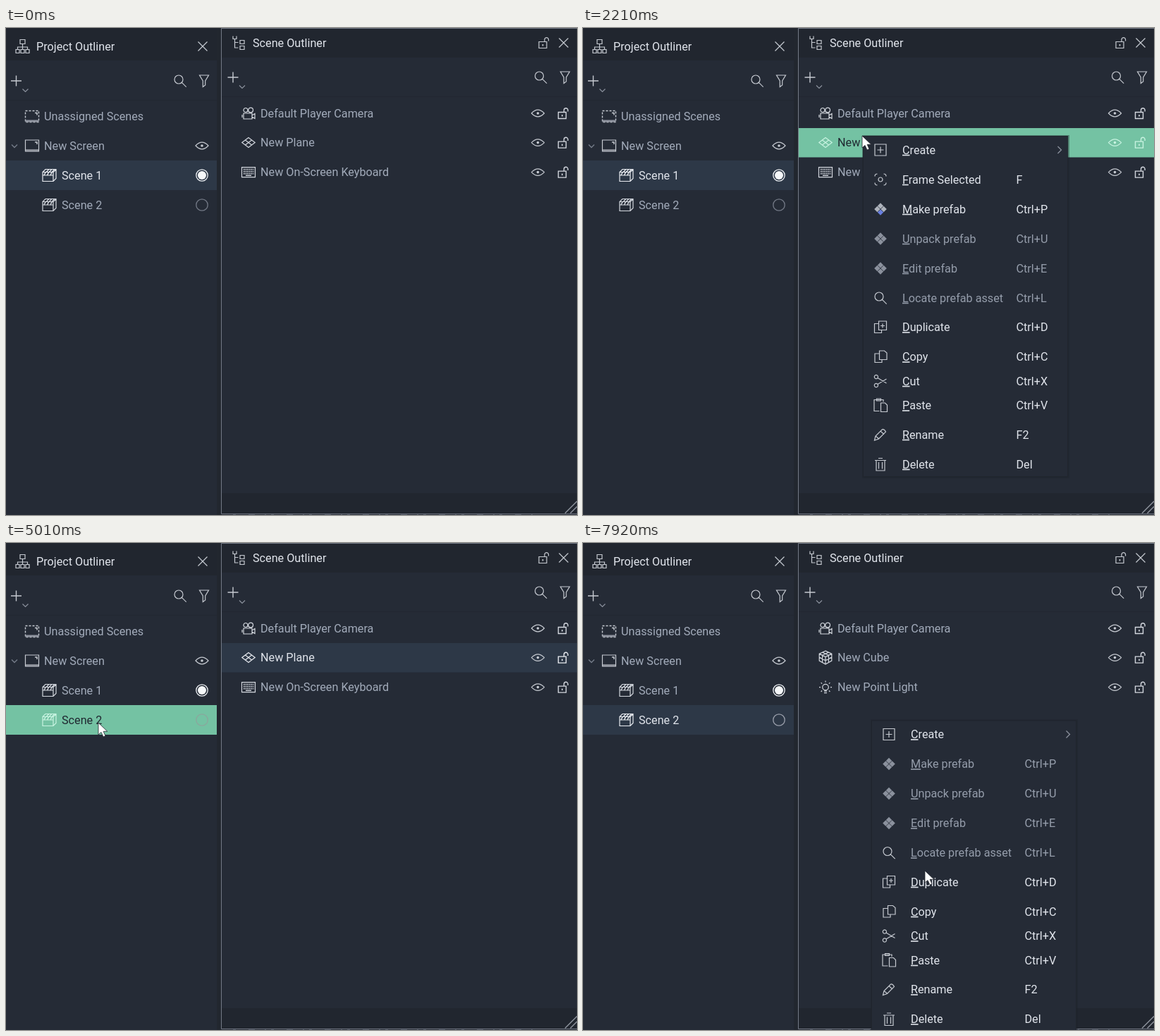
Write an HTML page that moves like this. It is 810x691 px and loops after 8 s.

```html
<!DOCTYPE html>
<html lang="en">
<head>
<meta charset="utf-8">
<title>Outliner panels</title>
<style>
  html, body { margin: 0; width: 100%; height: 100%; overflow: hidden; background: #252b36; }
  svg { display: block; width: 810px; height: 691px; }
  text { font: 16.2px Roboto, sans-serif; white-space: pre; }
  .key { text-decoration: underline; text-decoration-thickness: 1px; text-underline-offset: 2px; }
</style>
</head>
<body>
<svg id="stage" viewBox="0 0 810 691"></svg>
<script>
const LOOP = 8000;
const C = {
  bg: '#252b36', head: '#21262f', gap: '#22272f', dim: '#a2abba', text: '#e0e4eb',
  icon: '#c6cad1', faint: '#8b919d', hover: '#343a4a', selected: '#2d3847',
  green: '#74c2a3', onGreen: '#202831', pale: '#c8f3e1'
};

// Icon outlines, drawn around their own centre.
const ICONS = {
  project: 'M-3.5-9.5h7v6h-7zM0-3.5v8M-7 4.5v-3.5h14v3.5M-9.5 4.5h5v5h-5zM-2.5 4.5h5v5h-5zM4.5 4.5h5v5h-5z',
  tree: 'M-8.5-9.5v4h5v-4M-6-5.5v12.5h5M-6-.5h5M1.5-3.5h6v5h-6zM1.5 4.5h6v5h-6z',
  close: 'M-6.5-6.5l13 13M6.5-6.5l-13 13',
  plus: 'M-7.5 0h15M0-7.5v15',
  down: 'M-4-2l4 4l4-4',
  right: 'M-2.5-5l5 5l-5 5',
  search: 'M4-2a6 6 0 1 1-12 0a6 6 0 1 1 12 0M2.2 2.2l6.5 6.5',
  filter: 'M-6.5-8h13l-4.8 8v6l-3.4 2.5v-8.5z',
  eye: 'M-9 0q9-9.6 18 0q-9 9.6-18 0z',
  lock: 'M-6.5-1.5h11v9h-11zM1.5-1.5v-3a2.8 2.8 0 0 1 5.6 0v2',
  screen: 'M-9.5-8h19v16h-19z',
  scene: 'M-9.5-4.5l4-4h15v13l-4 4h-15zM-9.5-4.5h15v13M5.5-4.5l4-4M-9.5 0h15M-5.5-8.5h15',
  stripes: 'M-7.5 0l2-4.3M-3 0l2-4.3M1.5 0l2-4.3M-4-5l3-3M0-5l3-3M4-5l3-3',
  camera: 'M-7 0h12v8h-12zM5 3l4-2.5v7l-4-2.5M-1-4.5a3 3 0 1 1-6 0a3 3 0 1 1 6 0M6.5-4.5a3.4 3.4 0 1 1-6.8 0a3.4 3.4 0 1 1 6.8 0M-9 2v4',
  plane: 'M-9.2 0l9.2-7l9.2 7l-9.2 7zM-4.6-3.5l9.2 7M4.6-3.5l-9.2 7',
  keyboard: 'M-9.5-7h19v14h-19z',
  cube: 'M0-9.5l8.8 4v10l-8.8 5l-8.8-5v-10zM-8.8-5.5l8.8 4.5l8.8-4.5M0-1v10.5M-4.4-7.5l8.8 4.2v10M4.4-7.5l-8.8 4.2v10M-8.8-.5l8.8 4.7l8.8-4.7',
  light: 'M4.3 0a4.3 4.3 0 1 1-8.6 0a4.3 4.3 0 1 1 8.6 0M-2 5.5h4M-2 8h4M0-9v2M-9 0h2M7 0h2M-6.4-6.4l1.5 1.5M6.4-6.4l-1.5 1.5M-6.4 6.4l1.5-1.5M6.4 6.4l-1.5-1.5',
  create: 'M-8-8h16v16h-16zM-4.5 0h9M0-4.5v9',
  frame: 'M-8-4.5q0-3.5 3.5-3.5M4.5-8q3.5 0 3.5 3.5M8 4.5q0 3.5-3.5 3.5M-4.5 8q-3.5 0-3.5-3.5M3 0a3 3 0 1 1-6 0a3 3 0 1 1 6 0',
  duplicate: 'M-2.5-8.5h11v12.5h-11zM-2.5-5h-6v13h10v-4M0-2h6M3-5v6',
  copy: 'M-1.5-8.5h7l3.5 3v9.5h-10.5zM-1.5-4.5h-6.5v12.5h10v-4',
  cut: 'M-3.5-6a2.6 2.6 0 1 1-5.2 0a2.6 2.6 0 1 1 5.2 0M-3.5 6a2.6 2.6 0 1 1-5.2 0a2.6 2.6 0 1 1 5.2 0M-4-4.5l12.5 7.5M-4 4.5l12.5-7.5',
  paste: 'M-1.5 8h-7.5v-16h13v3M-5.5-9.5h6v3h-6zM.5-3.5h6l3 3v9.500h-9z',
  rename: 'M-8.5 8l1.500-6l9.5-9.5q3-.5 5 3.500l-10 10zM0-5l5 4.500M-7 2l5 4',
  trash: 'M-8-5.500h16M-3-8.500h6M-6-5.500v14.500h12v-14.500M-2.500-3v9.500M2.500-3v9.500'
};

const rect = (x, y, w, h, fill) => `<rect x="${x}" y="${y}" width="${w}" height="${h}" fill="${fill}"/>`;
const label = (x, y, s, fill) => `<text x="${x}" y="${y + 5.7}" fill="${fill}">${s}</text>`;
const path = (d, color, width = 1.2, more = '') =>
  `<path d="${d}" fill="none" stroke="${color}" stroke-width="${width}" ${more}/>`;
const at = (x, y, body) => `<g transform="translate(${x} ${y})">${body}</g>`;
const dot = (r, fill, more = '') => `<circle r="${r}" fill="${fill}" ${more}/>`;

function icon(name, x, y, color = C.icon, width = 1.2) {
  let body = path(ICONS[name], color, width);
  if (name === 'eye') body += dot(1.8, color);
  if (name === 'lock') body += rect(-1.8, 2, 1.6, 2.5, color);
  if (name === 'scene') body += path(ICONS.stripes, color, 1.5);
  if (name === 'screen') body += rect(-9, 5, 18, 3, color + '99') + path('M4-5h3v3', color, 1.5);
  if (name === 'keyboard')
    body += path('M-7-4h14.5M-7-1h14.5M-7 2h14.5', color, 1.6, 'stroke-dasharray="1.6 1.1"') + path('M-4 4.700h8', color, 1.4);
  return at(x, y, body);
}

function prefab(x, y, color, last = color) {
  const gem = (dx, dy, fill) => `<path d="M${dx} ${dy - 4.200}l4.200 4.200l-4.200 4.200l-4.200-4.200z" fill="${fill}"/>`;
  return at(x, y, gem(0, -4.6, color) + gem(-4.6, 0, color) + gem(4.6, 0, color) + gem(0, 4.6, last));
}

// Colours of a list row: [background, text, icon]
const LOOK = {
  plain: [null, C.dim, '#d3d7de'],
  hover: [C.hover, C.text, '#e8ebf0'],
  selected: [C.selected, C.text, '#e8ebf0'],
  active: [C.green, C.onGreen, C.pale]
};

function sceneRow(y, name, look, on) {
  const [back, text, ink] = LOOK[look];
  const ring = on ? '#eef1f5' : { plain: '#737986', active: '#8ba79d' }[look] || '#9a9fab';
  return (back ? rect(0, y - 21, 299, 42, back) : '') + icon('scene', 61.5, y, ink) + label(79, y, name, text) +
    at(278, y, dot(8.2, 'none', `stroke="${ring}" stroke-width="1.3"`) + (on ? dot(6, '#f6f8fa') : ''));
}

function objectRow(y, name, kind, look) {
  const [back, text, ink] = LOOK[look];
  return (back ? rect(306, Math.round(y - 20.8), 504, 41.5, back) : '') + icon(kind, 344, y, ink) +
    label(361, y, name, text) + icon('eye', 754.5, y, look === 'active' ? ink : C.icon) + icon('lock', 790, y, ink, 1.4);
}

function toolbar(x, y, searchX, filterX) {
  return icon('plus', x, y, C.icon, 1.4) + icon('down', x + 13, y + 13.5, C.faint) +
    icon('search', searchX, y) + icon('filter', filterX, y);
}

function projectPanel(s) {
  return rect(0, 0, 299, 46, C.head) + rect(0, 102, 299, 1, '#222731') + rect(299, 0, 6, 691, C.gap) +
    icon('project', 23.5, 26) + label(43, 26, 'Project Outliner', C.text) + icon('close', 279, 26) +
    toolbar(14.5, 75, 247, 281) +
    at(37, 125.5, path(ICONS.screen, C.icon, 1.4, 'stroke-dasharray="3 2"') + rect(-9.5, 5, 19, 3, '#8f949f') + path('M4-5h3v3', C.icon, 1.5)) +
    label(54, 125.3, 'Unassigned Scenes', C.dim) +
    icon('down', 12, 167.5, '#757c89', 1.4) + icon('screen', 37, 167, C.icon) + label(54, 167.3, 'New Screen', C.dim) +
    icon('eye', 278, 167) + sceneRow(209, 'Scene 1', s.first, true) + sceneRow(251, 'Scene 2', s.second, false);
}

function scenePanel(s) {
  const rows = s.swapped ? [['New Cube', 'cube'], ['New Point Light', 'light']]
                         : [['New Plane', 'plane'], ['New On-Screen Keyboard', 'keyboard']];
  return rect(306, 1, 504, 41, C.head) + rect(306, 97, 504, 1, '#222731') + rect(306, 660, 504, 29, C.head) +
    rect(305, 690, 505, 1, C.gap) + path('M322 690.500h425', '#414752', 1, 'stroke-dasharray="4 18 9 14 2 7"') +
    icon('tree', 330.5, 21) + label(350, 21.5, 'Scene Outliner', C.text) +
    icon('lock', 762.5, 21, C.icon) + icon('close', 791, 21) + toolbar(322, 70, 758.5, 793) +
    objectRow(121, 'Default Player Camera', 'camera', 'plain') +
    objectRow(162.6, ...rows[0], s.object) + objectRow(204.6, ...rows[1], s.last) +
    path('M810 .5H305.500V689.500H810', '#737986', 1) +
    path('M793 688.500l17-17M800.500 688.500l9.500-9.500', '#8d929c', 1.5);
}

// [label, shortcut, icon, y, disabled]
const MENU = [
  ['Create', '', 'create', 20], ['Frame Selected', 'F', 'frame', 62], ['Make prefab', 'Ctrl+P', 'prefab', 104],
  ['Unpack prefab', 'Ctrl+U', 'prefab', 146, 1], ['Edit prefab', 'Ctrl+E', 'prefab', 188, 1],
  ['Locate prefab asset', 'Ctrl+L', 'search', 230, 1], ['Duplicate', 'Ctrl+D', 'duplicate', 271.5],
  ['Copy', 'Ctrl+C', 'copy', 313.5], ['Cut', 'Ctrl+X', 'cut', 348], ['Paste', 'Ctrl+V', 'paste', 382.5],
  ['Rename', 'F2', 'rename', 424], ['Delete', 'Del', 'trash', 466]
];

function menu(kind, hovered) {
  const short = kind === 'empty';
  const items = MENU.filter(([name]) => !(short && name === 'Frame Selected')).map(([name, keys, kindOf, y0, off]) => {
    const y = short && y0 > 20 ? y0 - 42 : y0;
    const dim = off || (short && name === 'Make prefab');
    const color = dim ? '#959dab' : C.text;
    const mark = kindOf === 'prefab' ? prefab(25, y, dim ? C.faint : '#aeb3bc', dim ? C.faint : '#6a80e0')
                                     : icon(kindOf, 25, y, C.icon);
    return (name === hovered ? rect(2, y - 18, 287, 34.5, C.hover) : '') + mark +
      label(56, y, `<tspan class="key">${name[0]}</tspan>${name.slice(1)}`, color) + label(217.5, y, keys, color);
  }).join('');
  const h = short ? 442 : 484;
  return at(short ? 409 : 397, short ? 251.5 : 153,
    rect(-1, -1, 294, h + 3, '#1d222b66') + rect(0, 0, 291, h, '#20252d') + rect(1, 1, 289, h - 2, C.bg) +
    items + icon('right', 279, 20, C.faint, 1.3));
}

const pointer = (x, y, click) =>
  at(x, y, `<path d="M0 0V17L4 13.500L7 20L10 18.700L7.200 12.300H12.800Z" fill="#fff" stroke="#20242c" stroke-width=".8"/>`) +
  (click ? at(x, y, dot(15, '#f40004', 'fill-opacity=".5"')) : '');

// [time, pointer x, pointer y, state changes that stay until replaced]
const STEPS = [
  [0, -50, -50, { first: 'selected', second: 'plain', object: 'plain', last: 'plain' }],
  [260, 749, 333],
  [560, 392, 151, { last: 'hover' }],
  [840, 384, 148, { object: 'hover', last: 'plain' }],
  [1090, 390, 150],
  [1340, 396, 153],
  [1590, 396, 153, { object: 'active', click: 1 }],
  [1830, 396, 153, { click: 0 }],
  [2010, 396, 153, { menu: 'object' }],
  [2420, 412, 206, { item: 'Frame Selected' }],
  [2640, 452, 340, { item: '' }],
  [2860, 485, 441, { item: 'Duplicate' }],
  [3120, 490, 459, { item: 'Copy' }],
  [3340, 490, 459, { click: 1 }],
  [3580, 490, 459, { click: 0, menu: '', item: '' }],
  [3820, 452, 398],
  [4070, 367, 314],
  [4290, 222, 277],
  [4530, 138, 256, { second: 'hover' }],
  [4770, 131, 255, { first: 'plain', second: 'active', object: 'selected', click: 1 }],
  [5010, 131, 255, { click: 0 }],
  [5250, 132, 255, { click: 1 }],
  [5450, 132, 255, { click: 0 }],
  [5630, 136, 255, { swapped: 1, object: 'plain' }],
  [5810, 205, 256],
  [5990, 310, 255],
  [6160, 389, 252],
  [6340, 409, 251],
  [6600, 409, 251, { second: 'selected', click: 1 }],
  [6880, 409, 251, { click: 0, menu: 'empty' }],
  [7390, 444, 345],
  [7640, 477, 437],
  [7920, 485, 465]
];
let carried = {};
const scenes = STEPS.map(([time, x, y, change]) => {
  carried = { ...carried, ...change };
  return { ...carried, time, x, y };
});

const stage = document.getElementById('stage');
let shown;
function tick() {
  const t = performance.now() % LOOP;
  const s = scenes.findLast(scene => scene.time <= t);
  if (s !== shown) {
    stage.innerHTML = rect(0, 0, 810, 691, C.bg) + projectPanel(s) + scenePanel(s) +
      (s.menu ? menu(s.menu, s.item) : '') + pointer(s.x, s.y, s.click);
    shown = s;
  }
  requestAnimationFrame(tick);
}
tick();
</script>
</body>
</html>
```
